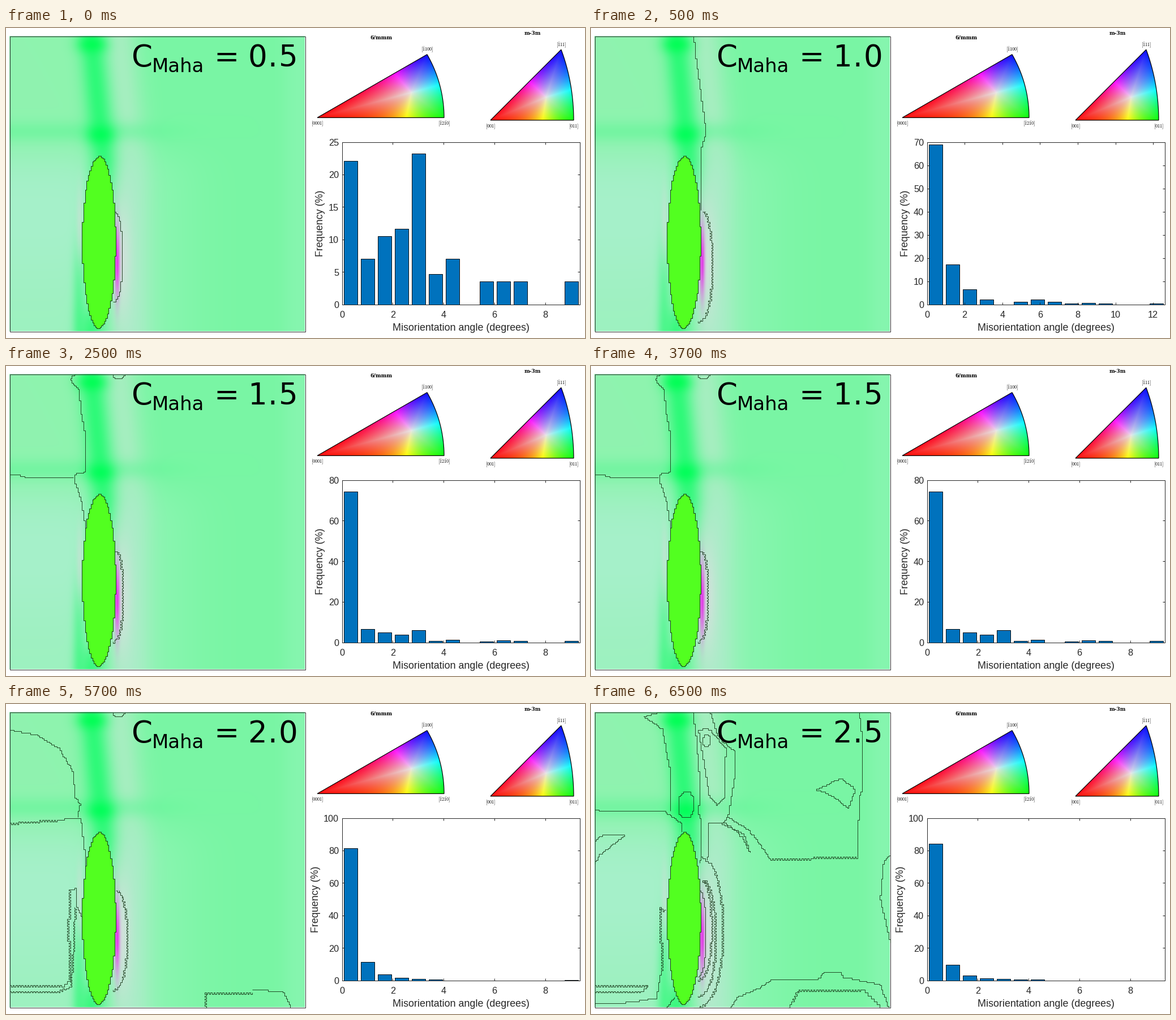
A matplotlib script that plays this animation: 1023x548 px, repeating every 8 s.

```python
import numpy as np
import matplotlib.pyplot as plt
from matplotlib.animation import FuncAnimation
from matplotlib.colors import hsv_to_rgb, to_rgb
from matplotlib.patches import Polygon, Rectangle

W, H, DPI = 1023, 548, 64
PX = 72 / DPI                       # points per pixel
CELL, X0, Y0 = 2.61, 6.5, 14.5      # map grid
INK, BLUE, EDGE = "#262626", "#0072bd", "#123012"

fig = plt.figure(figsize=(W / DPI, H / DPI), dpi=DPI, facecolor="white")
ax = fig.add_axes([0, 0, 1, 1])
ax.axis("off")


def text(x, y, s, size, family="Liberation Sans", color=INK, ha="center",
         va="baseline", **kw):
    return ax.text(x, y, s, fontsize=size * PX, family=family, color=color,
                   ha=ha, va=va, **kw)


def big(x, s, y=68, size=53):
    return text(x, y, s, size, "DejaVu Sans", "black", "left")


def line(x, y, color=INK, width=1.0):
    return ax.plot(x, y, color=color, lw=width * PX, solid_capstyle="butt",
                   solid_joinstyle="miter")[0]


# ---- orientation map -------------------------------------------------------
def bell(v, mid, width):
    return np.exp(-((v - mid) / width) ** 2 / 2)


def ramp(v, mid, width):
    return 1 / (1 + np.exp(-(v - mid) / width))


def orientation_map():
    x, y = np.meshgrid(np.arange(6, 528) + 0.5, np.arange(14, 536) + 0.5)
    img = np.ones(x.shape + (3,)) * to_rgb("#79f6a4")

    def mix(color, weight):
        nonlocal img
        w = np.clip(weight, 0, 1)[..., None]
        img = img * (1 - w) + np.array(to_rgb(color)) * w

    low = ramp(y, 225, 18)
    left = 1 - ramp(x, 150, 10)
    band = 150 + 18 * np.clip((y - 14) / 176, 0, 1.25)
    mix("#8ff3af", left)
    mix("#a6f0ca", low * left * (0.6 + 0.4 * bell(y, 330, 90)))
    mix("#8cf5b4", ramp(x, 495, 8) * 0.7)
    mix("#8cf5b2", low * (1 - ramp(x, 320, 30)) * ramp(x, 190, 8))
    mix("#a6eec0", bell(x, band + 48, 24) * (1 - 0.3 * low))
    mix("#acecca", low * bell(x, 222, 22) * 0.8)
    mix("#5af794", 0.5 * bell(y, 183, 13) * (1 - ramp(x, 290, 30)))
    mix("#26fa74", 0.9 * bell(x, band, 16) * (1 - ramp(y, 290, 25)))
    mix("#00ff54", bell(x, 152, 17) * bell(y, 29, 11) * 0.9)
    mix("#00ff58", bell(x, 167, 16) * bell(y, 188, 12) * 0.9)
    mix("#3cf882", 0.65 * bell(x, 129, 8) * ramp(y, 400, 25))
    mix("#2dfa76", bell(x, 150, 15) * ramp(y, 500, 12) * 0.9)
    mix("#d2e2dc", bell(x, 204, 13) * bell(y, 410, 75) * 0.95)
    mix("#cde1d7", bell(x, 130, 4) * bell(y, 345, 45) * 0.6)
    mix("#e23ce8", bell(x, 196.5, 3.2) * bell(y, 412, 42))
    return np.clip(img, 0, 1)


def stair(points, jag=0):
    """Polyline snapped to the cell grid; jag adds one-cell teeth."""
    p = (np.reshape(points, (-1, 2)) - (X0, Y0)) / CELL
    parts = []
    for a, b in zip(p, p[1:]):
        d = abs(b - a)
        minor = int(d[0] > d[1])
        n = int(max(d)) + 1
        q = np.rint(a + np.arange(n)[:, None] / n * (b - a))
        q[:, minor] += jag * (q[:, 1 - minor] % 2)
        parts.append(q)
    q = np.clip(np.rint(np.vstack(parts + [p[-1:]])), 0, 200)
    out = np.repeat(q, 2, axis=0)[:-1]
    out[1::2, 0] = q[1:, 0]
    return out * CELL + (X0, Y0)


def curve(*points, jag=0):
    return line(*stair(points, jag).T, EDGE, 0.85)


def arc(cx, cy, rx, ry, start=-80, stop=90, jag=0):
    """Slightly boxy elliptic arc, angles in degrees downwards."""
    t = np.radians(np.linspace(start, stop, 61))
    c = np.cos(t)
    x = cx + rx * np.sign(c) * abs(c) ** 0.75
    return curve(*np.c_[x, cy + ry * np.sin(t)].ravel(), jag=jag)


def loop(cx, cy, rx, ry):
    return arc(cx, cy, rx, ry, 0, 360)


ax.imshow(orientation_map(), extent=(6, 528, 536, 14), aspect="auto",
          interpolation="nearest")
turn = np.linspace(0, 2 * np.pi, 121)
grain = stair(np.c_[164.2 + 29.3 * np.cos(turn), 378.6 + 152 * np.sin(turn)])
ax.add_patch(Polygon(grain, fc="#52ff20", ec=EDGE, lw=0.9 * PX))
ax.add_patch(Rectangle((X0, Y0), 522, 522, fill=False, ec="#333333", lw=PX))


# ---- colour keys -----------------------------------------------------------
def color_key(a, rounded):
    """Key with red corner a; the rounded side runs from green to blue."""
    a, b, c = np.array(a), rounded[0], rounded[-1]
    edge = np.vstack([a, rounded, a])
    s = np.linspace(0, 1, 30, endpoint=False)[:, None]
    rim = np.vstack([p + s * (q - p) for p, q in zip(edge, edge[1:])])
    sides = [np.hypot(*(b - c)), np.hypot(*(a - c)), np.hypot(*(a - b))]
    mid = np.average([a, b, c], axis=0, weights=sides)

    def polar(x, y):
        return np.arctan2(mid[1] - y, x - mid[0]), np.hypot(x - mid[0], y - mid[1])

    lo, hi = np.floor(edge.min(0)), np.ceil(edge.max(0))
    x, y = np.meshgrid(np.arange(lo[0], hi[0]) + 0.5, np.arange(lo[1], hi[1]) + 0.5)
    ang, rad = polar(x, y)
    rim_ang, rim_rad = polar(*rim.T)
    sat = np.clip(rad / np.interp(ang, rim_ang, rim_rad, period=2 * np.pi), 0, 1)
    start = polar(*a)[0]
    stops = [(polar(*p)[0] - start) % (2 * np.pi) for p in (b, c)]
    hue = np.interp((ang - start) % (2 * np.pi), [0, *stops, 2 * np.pi],
                    np.linspace(0, 1, 4))
    pure = hsv_to_rgb(np.dstack([hue % 1, np.ones_like(hue), np.ones_like(hue)]))
    w = (0.95 * sat ** 0.85)[..., None]
    im = ax.imshow(pure * w + 0.91 * (1 - w), extent=(lo[0], hi[0], hi[1], lo[1]),
                   aspect="auto", interpolation="nearest")
    border = ax.add_patch(Polygon(edge, fill=False, ec="black", lw=1.2 * PX))
    im.set_clip_path(border)


t = np.linspace(0, np.pi / 6, 25)
color_key((550, 158.5), np.c_[550 + 224 * np.cos(t), 158.5 - 223.5 * np.sin(t)])

# equal-area projection of the great circle from [011] to [111]
s = np.linspace(0, 1, 25)
norm = np.sqrt(2 + s ** 2)
k = np.sqrt(2 / (1 + 1 / norm)) / norm * 147 / 0.7654
color_key((856, 163), np.c_[856 + k, 163 - k * s])


def direction(x, y, s):
    text(x, y, f"$\\mathrm{{[{s}]}}$", 8.3, color="black", math_fontfamily="cm")


text(662.5, 19.5, "6/mmm", 9.3, "DejaVu Serif", "black", weight="bold")
text(930, 12, "m-3m", 9, "DejaVu Serif", "black", weight="bold")
direction(550, 171, "0001")
direction(774, 171, r"\bar{1}2\bar{1}0")
direction(744, 40, r"\bar{1}100")
direction(856, 176, "001")
direction(1003, 176, "011")
direction(981, 32, r"\bar{1}11")

# ---- fixed labels ----------------------------------------------------------
big(222, "C")
big(257.5, "Maha", 78, 34)
big(367.5, "=")
text(803.5, 535, "Misorientation angle (degrees)", 17.85)

# ---- histogram -------------------------------------------------------------
L, R, T, B = 593.5, 1014, 201.5, 488.5


def histogram(heights, top, step, unit=44.9, last=0):
    """unit: pixels per degree; last: height of the final bar."""
    bars = dict(enumerate(heights))
    bars[13] = last
    made = []
    for i, h in bars.items():
        if h:
            px = h / top * (B - T)
            made.append(ax.add_patch(Rectangle(
                (596.6 + 30.05 * i, B - px), 24, px, fc=BLUE, ec="black", lw=0.9 * PX)))
    made.append(ax.add_patch(Rectangle((L, T), R - L, B - T, fill=False,
                                       ec=INK, lw=PX)))
    for v in range(0, top + 1, step):
        y = B - v / top * (B - T)
        made += [line([L, L + 4], [y, y]), line([R - 4, R], [y, y]),
                 text(588, y + 6.5, str(v), 16.3, ha="right")]
    for v in range(0, int((R - L) / unit) + 1, 2):
        x = L + v * unit
        made += [line([x, x], [B, B - 4]), line([x, x], [T, T + 4]),
                 text(x, 512, str(v), 16.3)]
    made.append(text(547 if top == 100 else 556, (T + B) / 2, "Frequency (%)", 17.85,
                     va="center", rotation=90))
    return made


# ---- scenes ----------------------------------------------------------------
def notch():
    return arc(199, 14, 11, 8, 0, 180)


def scene_05():
    return [
        arc(188, 404, 18, 81),
        *histogram([22.1, 7, 10.5, 11.6, 23.25, 4.65, 7, 0, 3.5, 3.5, 3.5],
                   25, 5, last=3.5)]


def scene_10():
    return [
        curve(182, 14, 184, 45, 195, 125, 203, 185, 195, 215, 194, 322),
        arc(190, 420, 23, 98, jag=1),
        *histogram([68.8, 17.3, 6.5, 2, 0, 1.1, 2, 1.1, 0.3, 0.6, 0.3],
                   70, 10, 33.3, 0.3)]


def scene_15():
    return [
        curve(124, 14, 113, 24, 128, 44, 133, 85, 139, 118, 139, 188),
        curve(139, 188, 123, 190, 121, 206, 134, 245, 140, 285),
        curve(6, 191, 19, 192, 35, 197, 119, 196),
        notch(),
        arc(188, 406, 18, 81, jag=1),
        *histogram([74.3, 6.6, 4.9, 3.7, 6.1, 0.7, 1.3, 0, 0.4, 1, 0.7],
                   80, 20, last=0.7)]


def scene_20():
    return [
        curve(6, 46, 55, 55, 95, 80, 118, 122, 122, 165, 131, 178, 126, 200),
        curve(6, 210, 90, 204, jag=1),
        curve(90, 204, 132, 203, 138, 255, 140, 285),
        notch(),
        arc(188, 416, 25, 88, jag=1),
        curve(6, 498, 100, 497, 112, 485, 109, 400, 111, 327, jag=1),
        curve(111, 327, 124, 326, 124, 356, 134, 378),
        curve(6, 508, 90, 508, 113, 498, 118, 430, 121, 360, jag=1),
        curve(352, 536, 350, 511, 435, 511, jag=1),
        curve(435, 505, 488, 508, 503, 536),
        *histogram([81.4, 11.3, 3.8, 1.6, 0.8, 0.6], 100, 20, last=0.2)]


def scene_25():
    upper = [
        curve(124, 14, 92, 23, 125, 44, 139, 115, 139, 190),
        curve(6, 186, 18, 190, 130, 190, 160, 212, 160, 226),
        curve(180, 14, 186, 65, 192, 140, 190, 195, 195, 210, 193, 280),
        curve(190, 46, 205, 42, 238, 80, 235, 165, 224, 178, 210, 165, 190, 46),
        loop(204, 64, 7, 10),
        loop(168, 178, 14, 23),
        curve(210, 14, 225, 60, 254, 85, 254, 130, 242, 200, 280, 225, 315, 272),
        curve(315, 273, 470, 270, jag=1),
        curve(470, 270, 474, 160, 480, 152, 480, 70, 474, 14),
        curve(206, 275, 208, 211, 236, 210, 266, 235, 280, 262),
        curve(242, 200, 232, 212, 270, 230, 280, 262),
        curve(398, 151, 440, 131, 467, 152, 455, 184, 430, 163, 398, 151),
        curve(6, 241, 20, 231, 60, 232, 15, 268, 6, 283)]
    lower = [
        curve(528, 268, 517, 280, 511, 345, 528, 422),
        arc(182, 402, 50, 134, jag=1),
        arc(188, 412, 31, 103, jag=1),
        arc(190, 398, 22, 88, jag=1),
        arc(189, 405, 14, 76),
        curve(133, 365, 121, 360, 124, 475, jag=1),
        curve(124, 475, 115, 520, 72, 527, 6, 530),
        curve(6, 498, 100, 498, 90, 507, 6, 508, jag=1),
        curve(132, 536, 147, 518),
        curve(245, 536, 258, 518, 305, 497, 318, 488, 400, 488),
        curve(400, 488, 410, 473, 440, 474, 445, 483, 510, 496, 525, 536),
        curve(348, 536, 365, 505, 480, 505, 510, 536, jag=1)]
    return upper + lower + histogram([84.3, 9.6, 2.8, 1.3, 1, 0.4, 0.4], 100, 20)


scenes = []
for n, build in enumerate([scene_05, scene_10, scene_15, scene_20, scene_25]):
    whole, tenth = f"{0.5 + 0.5 * n:.1f}".split(".")
    scenes.append(build() + [big(427.5, whole), big(462, "."), big(481.5, tenth)])
ax.set_xlim(0, W)
ax.set_ylim(H, 0)

STEP = 500


def update(i):
    # the first value shows for one step, each later one for four
    now = (i + 3) // 4
    for n, artists in enumerate(scenes):
        for artist in artists:
            artist.set_visible(n == now)
    return []


anim = FuncAnimation(fig, update, frames=16, interval=STEP, repeat=True,
                     repeat_delay=0, blit=False)
plt.show()
```
